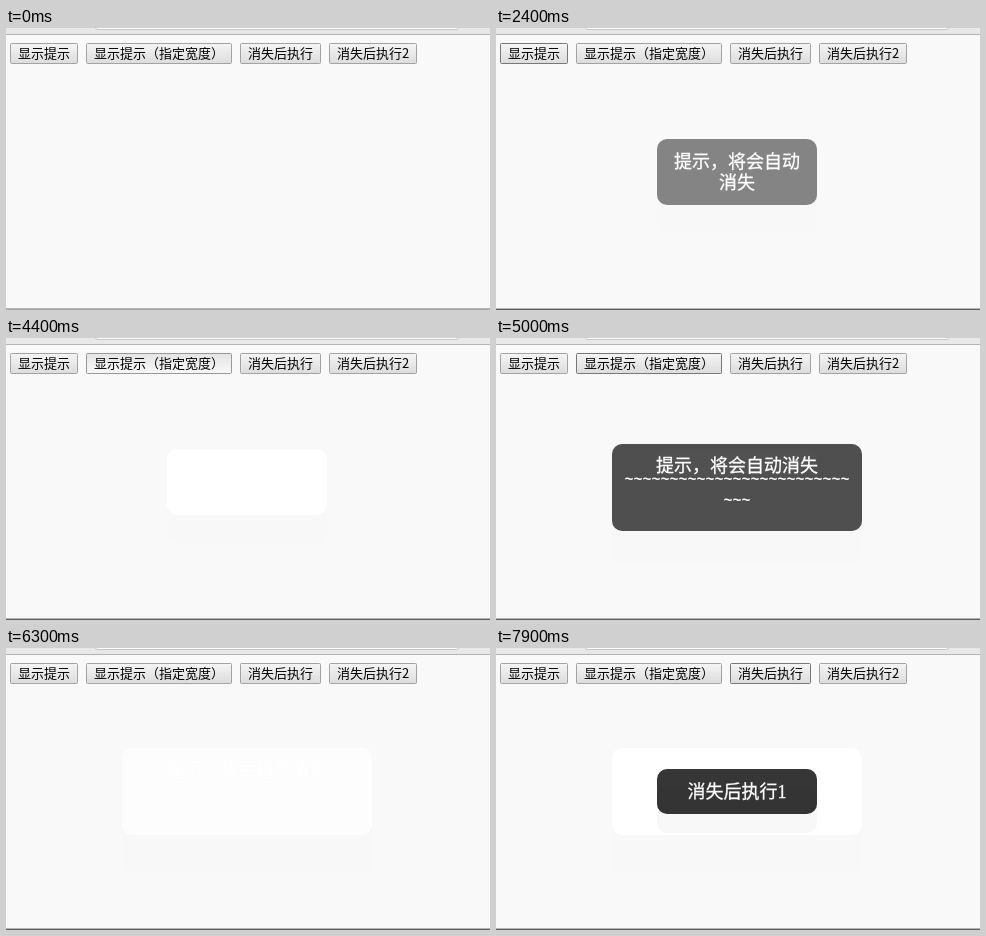
These frames come from a looping animation (484 by 282 pixels, 8000 ms). An HTML page:

```html
<!DOCTYPE html>
<html lang="zh-CN">
<head>
<meta charset="utf-8">
<style>
  html, body { margin: 0; width: 100%; height: 100%; overflow: hidden; background: #f9f9f9; }
  svg { display: block; }
  text { text-anchor: middle; white-space: pre; }
  .button { font: 13px 'Noto Sans CJK SC', 'Noto Sans CJK', sans-serif; fill: #000; }
  .toast { font: 18px 'Liberation Serif', 'Noto Sans CJK SC', 'Noto Sans CJK', serif; fill: #fff; stroke: #fff; stroke-width: .3px; }
  .tildes { font: bold 15px 'Liberation Mono', monospace; stroke: none; }
</style>
</head>
<body>
<svg id="stage" width="484" height="282" viewBox="0 0 484 282">
  <defs>
    <linearGradient id="raised" x2="0" y2="1">
      <stop stop-color="#f5f5f5"/><stop offset="1" stop-color="#dcdcdc"/>
    </linearGradient>
    <linearGradient id="pressed" x2="0" y2="1">
      <stop stop-color="#e4e4e4"/><stop offset="1" stop-color="#f8f8f8"/>
    </linearGradient>
  </defs>
  <rect width="484" height="282" fill="#f9f9f9"/>
  <rect width="484" height="6" fill="#e8e8e8"/>
  <rect x="89" y="-10" width="364" height="11.5" rx="3" fill="#fff" stroke="#c4c4c4"/>
  <rect y="6" width="484" height="1" fill="#b4b4b4"/>
  <rect y="280" width="484" height="1" fill="#b4b4b4"/>
  <rect id="edge" y="281" width="484" height="1"/>
</svg>
<script>
const LOOP = 8000, STEP = 100, SLIDE = 940, MIDDLE = 143.5;
const stage = document.getElementById('stage');
const edge = document.getElementById('edge');

function add(parent, tag, attrs, content = '') {
  const node = document.createElementNS('http://www.w3.org/2000/svg', tag);
  for (const key in attrs) node.setAttribute(key, attrs[key]);
  node.textContent = content;
  return parent.appendChild(node);
}

// Times: pointer enters, presses, releases, leaves
const buttons = [
  { label: '显示提示', x: 4, w: 68, times: [600, 700, 900, 3000] },
  { label: '显示提示（指定宽度）', x: 80, w: 146, times: [4400, 4400, 4500, 6000] },
  { label: '消失后执行', x: 234, w: 81, times: [6700, 6700, 6800, LOOP] },
  { label: '消失后执行2', x: 323, w: 88, times: [LOOP, LOOP, LOOP, LOOP] }
];
for (const b of buttons) {
  b.face = add(stage, 'rect', { x: b.x + .5, y: 15.5, width: b.w - 1, height: 20, rx: 1 });
  add(stage, 'text', { class: 'button', x: b.x + b.w / 2, y: 30 }, b.label);
}

// Lines hold text, baseline below the top of the box, and an optional class
const toasts = [
  { x: 161, y: 111, w: 160, h: 66, show: 1200, rise: 985, fade: 1996,
    lines: [['提示，将会自动', 29], ['消失', 50]] },
  { x: 116, y: 100, w: 250, h: 87, show: 4500, rise: 4285, fade: 5405,
    lines: [['提示，将会自动消失', 28], ['~'.repeat(25), 40, 'tildes'], ['~'.repeat(3), 61, 'tildes']] },
  { x: 161, y: 121, w: 160, h: 45, show: 6800, rise: 6565, fade: LOOP,
    lines: [['消失后执行1', 29]] }
];

const swing = p => .5 - Math.cos(Math.PI * Math.min(1, Math.max(0, p))) / 2;
const risenTop = (toast, t) => Math.round(MIDDLE + (toast.y - MIDDLE) * swing((t - toast.rise) / SLIDE));

for (const toast of toasts) {
  const { x, y, w: width, h: height } = toast;
  const box = (parent, top, fill) => add(parent, 'rect', { x, y: top, width, height, rx: 10, fill });
  toast.trail = box(stage, risenTop(toast, toast.show), '#f8f8f8');
  toast.ghost = box(stage, y, '#fff');
  toast.group = add(stage, 'g', {});
  box(toast.group, 0, '#040404');
  for (const [line, baseline, style = ''] of toast.lines)
    add(toast.group, 'text', { class: 'toast ' + style, x: x + width / 2, y: baseline }, line);
}

function draw(t) {
  edge.setAttribute('fill', t < 1100 ? '#a8a8a8' : '#606060');
  for (const { face, times: [enter, press, release, leave] } of buttons) {
    const hovered = t >= enter && t < leave;
    const pressed = t >= press && t < release;
    face.setAttribute('fill', pressed ? 'url(#pressed)' : 'url(#raised)');
    face.setAttribute('stroke', pressed ? '#999' : hovered ? '#787878' : '#a3a3a3');
  }
  for (const toast of toasts) {
    const shown = t >= toast.show;
    const opacity = .8 * swing((t - toast.rise) / SLIDE) * (1 - swing((t - toast.fade) / SLIDE));
    toast.trail.setAttribute('visibility', shown ? 'visible' : 'hidden');
    toast.ghost.setAttribute('visibility', t >= toast.fade ? 'visible' : 'hidden');
    toast.group.setAttribute('opacity', shown ? opacity : 0);
    toast.group.setAttribute('transform', `translate(0 ${risenTop(toast, t)})`);
  }
}

const start = performance.now();
function tick() {
  const t = (performance.now() - start) % LOOP;
  draw(Math.floor(t / STEP) * STEP);
  requestAnimationFrame(tick);
}
tick();
</script>
</body>
</html>
```
